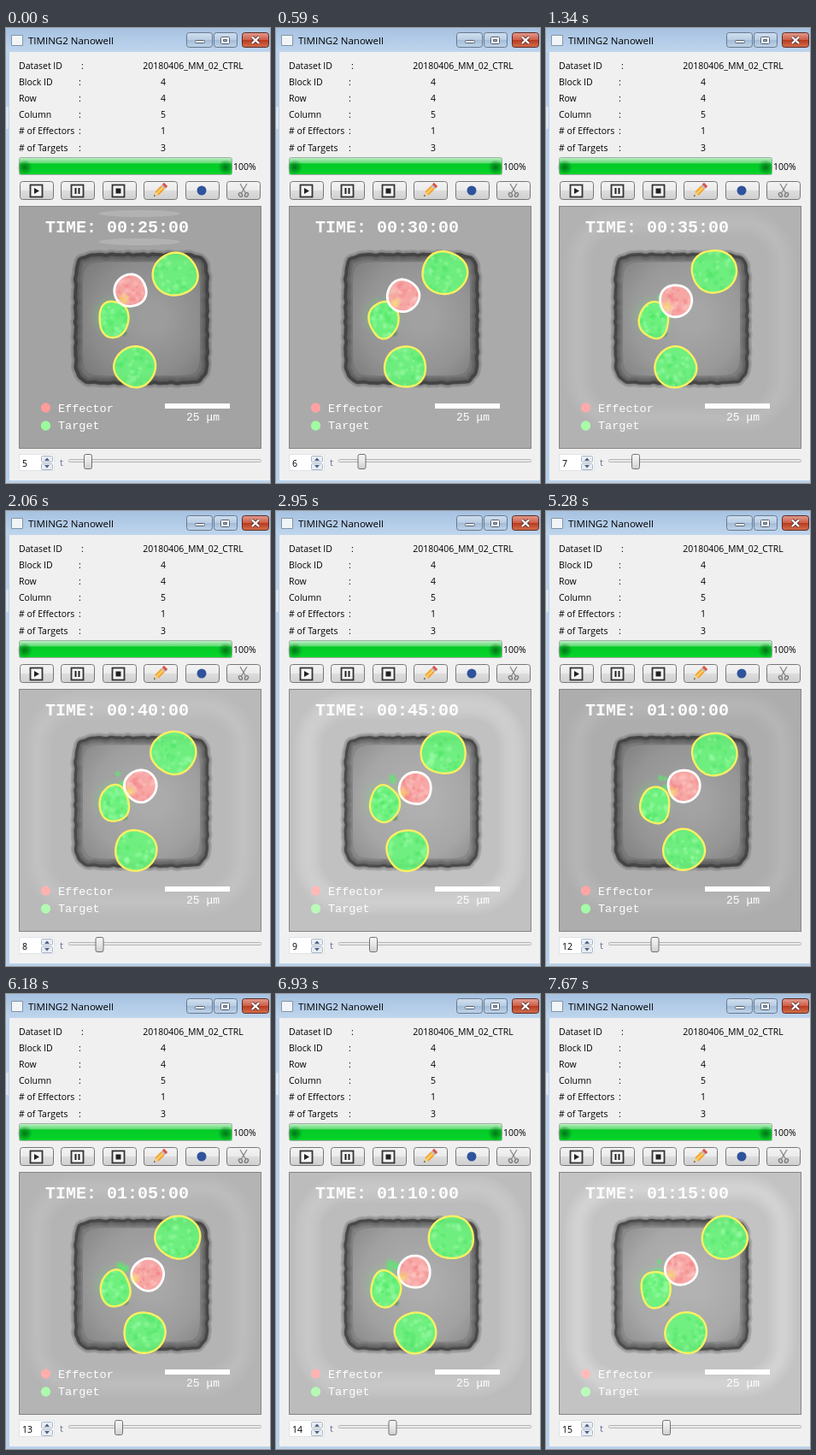
An HTML page with a canvas that plays this animation: 309 px wide and 532 px high, repeating every 8 s.

```html
<!DOCTYPE html>
<html lang="en">
<head>
<meta charset="utf-8">
<title>Nanowell viewer</title>
<style>
  html, body { margin: 0; width: 100%; height: 100%; overflow: hidden; background: #f0f0f0; }
  canvas { display: block; width: 309px; height: 532px; }
</style>
</head>
<body>
<canvas id="stage"></canvas>
<script>
const W = 309, H = 532, LOOP = 8000;
const FIRST = 5, LAST = 15;
const STARTS = [0, 590, 1340, 2060, 2950, 3670, 4540, 5280, 6180, 6930, 7670];
const UI = '"Open Sans", "Noto Sans", sans-serif';
const MONO = '"Liberation Mono", monospace';
const TAU = Math.PI * 2;

const canvas = document.getElementById('stage');
const ctx = canvas.getContext('2d');
const dpr = window.devicePixelRatio || 1;
canvas.width = Math.round(W * dpr);
canvas.height = Math.round(H * dpr);
ctx.scale(dpr, dpr);

const GREEN = { fill: '106,248,124', light: '165,255,175', dark: '68,226,96', rim: '#fbf062', rimWidth: 2.4 };
const PINK = { fill: '255,168,166', light: '255,205,200', dark: '243,120,124', rim: '#fff', rimWidth: 2.8 };

// Each path holds points evenly spaced over the whole run.
const upper = { look: GREEN, rx: 26.3, ry: 24.8, lobe: .018, path: [[198, 288], [196, 282], [196, 284], [209, 285]] };
const left = { look: GREEN, rx: 17.2, ry: 21.4, lobe: .035, path: [[126, 340.5], [128.5, 345.5]] };
const lower = { look: GREEN, rx: 24.2, ry: 23.8, lobe: .018, path: [[151, 396], [152, 397], [161, 396], [164, 396]] };
const effector = { look: PINK, rx: 18.7, ry: 18.7, lobe: .018,
  path: [[145.5, 307], [152, 319], [163, 324], [157, 315], [166, 328], [158, 321.5]] };
const CELLS = [upper, left, lower, effector];

function position(path, t) {
  const u = (t - FIRST) / (LAST - FIRST) * (path.length - 1);
  const i = Math.min(Math.floor(u), path.length - 2);
  return path[i].map((v, j) => v + (path[i + 1][j] - v) * (u - i));
}

// Brightness climbs for seven time points, then refocuses.
const brightness = t => Math.min(196, 163 + 6 * ((t - FIRST) % 7) + 1.4 * (t - FIRST));

function random(seed) {
  return () => {
    seed = (seed * 1664525 + 1013904223) % 4294967296;
    return seed / 4294967296;
  };
}

const gray = v => { v = Math.round(v); return `rgb(${v},${v},${v})`; };

function rect(x, y, w, h, fill) {
  ctx.fillStyle = fill;
  ctx.fillRect(x, y, w, h);
}

function box(x, y, w, h, r, fill, stroke) {
  ctx.beginPath();
  ctx.roundRect(x + .5, y + .5, w - 1, h - 1, r);
  ctx.fillStyle = fill;
  ctx.fill();
  if (!stroke) return;
  ctx.strokeStyle = stroke;
  ctx.lineWidth = 1;
  ctx.stroke();
}

function ellipse(x, y, rx, ry, fill) {
  ctx.beginPath();
  ctx.ellipse(x, y, rx, ry, 0, 0, TAU);
  ctx.fillStyle = fill;
  ctx.fill();
}

const disc = (x, y, r, fill) => ellipse(x, y, r, r, fill);

function poly(points, fill) {
  ctx.beginPath();
  points.forEach(([x, y]) => ctx.lineTo(x, y));
  ctx.closePath();
  ctx.fillStyle = fill;
  ctx.fill();
}

function stroke(color, width) {
  ctx.strokeStyle = color;
  ctx.lineWidth = width;
  ctx.stroke();
}

function line(x1, y1, x2, y2, color, width) {
  ctx.beginPath();
  ctx.moveTo(x1, y1);
  ctx.lineTo(x2, y2);
  stroke(color, width);
}

function vertical(y, h, ...stops) {
  const g = ctx.createLinearGradient(0, y, 0, y + h);
  stops.forEach(([at, color]) => g.addColorStop(at, color));
  return g;
}

function glow(x, y, r, rgb, alpha) {
  const g = ctx.createRadialGradient(x, y, 0, x, y, r);
  g.addColorStop(0, `rgba(${rgb},${alpha})`);
  g.addColorStop(1, `rgba(${rgb},0)`);
  disc(x, y, r, g);
}

function text(str, x, y, font, color = '#000', align = 'left') {
  ctx.font = font;
  ctx.fillStyle = color;
  ctx.textAlign = align;
  ctx.fillText(str, x, y);
}

const label = (str, x, y, align) => text(str, x, y, '10.5px ' + UI, '#000', align);

function titleBar() {
  rect(0, 0, W, 28, vertical(0, 28, [0, '#a6c2e1'], [1, '#bfd5ed']));
  rect(0, 28, 4, H, '#b9d1ea');
  rect(0, 92, 3, 26, '#d9e5f2');
  box(6, 8, 14, 13, 0, '#f2f5f7', '#8494a6');
  text('TIMING2 Nanowell', 26, 18.5, '11.5px ' + UI);

  const glass = vertical(5, 18, [0, '#d3e1f0'], [.48, '#b9cde3'], [.52, '#a3bcd8'], [1, '#c2d6ea']);
  const red = vertical(5, 18, [0, '#e2a093'], [.48, '#cf5f49'], [.52, '#b83a20'], [1, '#d5744f']);
  box(211, 5, 31, 18, 3, glass, '#66788f');
  box(243, 5, 28, 18, 3, glass, '#66788f');
  box(276, 5, 32, 18, 3, red, '#5b2a27');
  box(221, 14, 12, 4, 1, '#fff', '#535f6f');
  box(251, 10, 11, 9, 1, '#fff', '#535f6f');
  box(254, 13, 5, 3, 0, '#9db4cf', '#535f6f');
  for (const [color, width] of [['#5d3a3a', 4], ['#fff', 2.3]]) {
    line(288, 10.5, 296, 18, color, width);
    line(296, 10.5, 288, 18, color, width);
  }
}

function info() {
  const rows = [['Dataset ID', '20180406_MM_02_CTRL'], ['Block ID', '4'], ['Row', '4'],
    ['Column', '5'], ['# of Effectors', '1'], ['# of Targets', '3']];
  rows.forEach(([name, value], i) => {
    const y = 48 + i * 19.1;
    label(name, 15, y);
    label(':', i ? 85 : 88, y);
    label(value, i ? 184 : 219, y, 'center');
  });
}

function progress() {
  box(15, 151, 250, 21, 2, vertical(151, 21,
    [0, '#d3f4d8'], [.1, '#a9ebb3'], [.32, '#62dc75'], [.38, '#04ca26'], [1, '#04d62a']), '#a3aea5');
  for (const x of [22, 257]) glow(x, 163, 9, '0,95,20', .8);
  label('100%', 266, 166);
}

function frameIcon(cx) {
  box(cx - 7, 183, 15, 15, 2, '#f4f4f4');
  ctx.strokeStyle = '#333';
  ctx.lineWidth = 1.8;
  ctx.strokeRect(cx - 6.5, 183.5, 14, 14);
}

function pencil(x, y) {
  ctx.save();
  ctx.translate(x, y);
  ctx.rotate(-Math.PI / 4);
  rect(-5, -3, 10, 6, '#f2a431');
  rect(-5, -1, 10, 2, '#ffd06b');
  rect(5, -3, 2, 6, '#b9bcc4');
  rect(7, -3, 3, 6, '#d9534a');
  poly([[-5, -3], [-10, 0], [-5, 3]], '#e8cfa4');
  poly([[-8, -1], [-10, 0], [-8, 1]], '#333');
  ctx.restore();
}

function scissors(x, y) {
  for (const side of [-1, 1]) {
    line(x + side * 4, y - 8, x - side * 2.5, y + 3, '#888', 1.3);
    ctx.beginPath();
    ctx.ellipse(x + side * 3.5, y + 5, 1.8, 2.6, side / 2, 0, TAU);
    stroke('#777', 1.3);
  }
}

function toolbar() {
  const face = vertical(179, 22, [0, '#f4f4f4'], [.48, '#ebebeb'], [.52, '#dcdcdc'], [1, '#cfcfcf']);
  for (let i = 0; i < 6; i++) box(Math.round(16 + i * 48.4), 179, 40, 22, 3, face, '#777');
  [35, 83, 131].forEach(frameIcon);
  poly([[33, 187], [39, 190.5], [33, 194]], '#222');
  rect(80.5, 187, 2, 7, '#222');
  rect(84.5, 187, 2, 7, '#222');
  rect(128.5, 187.5, 6, 6, '#222');
  pencil(180, 190);
  disc(229, 190, 5.5, '#2f539c');
  scissors(278, 190);
}

// Squarish outline of the well with a ragged edge.
function wellPath(inset, rough = 0) {
  const n = 9, count = 260;
  ctx.beginPath();
  for (let i = 0; i < count; i++) {
    const a = i / count * TAU, c = Math.cos(a), s = Math.sin(a);
    const r = (Math.abs(c) ** n + Math.abs(s) ** n) ** (-1 / n);
    const d = rough * (Math.sin(a * 31) + .7 * Math.sin(a * 53 + 1)) * .45 - inset;
    ctx.lineTo(158.5 + r * c * (79.5 + d), 340 + r * s * (77.5 + d));
  }
  ctx.closePath();
}

function well(level) {
  const dim = (196 - level) / 33;
  wellPath(1, 1);
  ctx.fillStyle = gray(level * .7);
  ctx.fill();
  wellPath(11);
  const g = ctx.createRadialGradient(172, 338, 15, 160, 340, 98);
  g.addColorStop(0, gray(level * .91 + dim * 8));
  g.addColorStop(.6, gray(level * .86));
  g.addColorStop(1, gray(level * .73));
  ctx.fillStyle = g;
  ctx.fill();
  for (let w = 3; w <= 12; w += 3) {
    wellPath(3, 1);
    stroke('rgba(60,60,60,.17)', w);
  }
  wellPath(2.5, 1);
  stroke(gray(76 - dim * 10), 2.8 + dim);
}

function backdrop(level) {
  const halo = Math.max(0, (level - 166) / 30);
  rect(15, 208, 284, 284, gray(level));
  for (let w = 6; w <= 34; w += 4) {
    ctx.beginPath();
    ctx.roundRect(37, 227, 240, 229, 48);
    stroke(`rgba(255,255,255,${.032 * halo})`, w);
  }
  if (!halo) {
    for (const y of [217, 250]) ellipse(156, y, 48, 4, 'rgba(255,255,255,.16)');
  }
  well(level);
}

function cellPath(x, y, { rx, ry, lobe }, phase) {
  ctx.beginPath();
  for (let i = 0; i < 90; i++) {
    const a = i / 90 * TAU;
    const r = 1 + lobe * Math.sin(3 * a + phase) + lobe * .6 * Math.sin(4 * a + phase * 2);
    ctx.lineTo(x + rx * r * Math.cos(a), y + ry * r * Math.sin(a));
  }
  ctx.closePath();
}

function drawCell(cell, index, t) {
  const { look, rx, ry } = cell;
  const [x, y] = position(cell.path, t);
  const phase = t * 1.3 + index * 2;
  const rnd = random(t * 977 + index * 131);
  cellPath(x, y, cell, phase);
  ctx.save();
  ctx.clip();
  rect(x - 35, y - 35, 70, 70, `rgba(${look.fill},.9)`);
  for (let i = 0; i < 34; i++) {
    const a = rnd() * TAU, d = Math.sqrt(rnd()) * .95;
    const rgb = rnd() > .45 ? look.light : look.dark;
    glow(x + rx * d * Math.cos(a), y + ry * d * Math.sin(a), 2 + rnd() * 3.5, rgb, .5);
  }
  ctx.restore();
  cellPath(x, y, cell, phase);
  stroke(look.rim, look.rimWidth);
}

// Loose fluorescence around the contact between the effector and its neighbour.
function debris(t) {
  const [x, y] = position(left.path, t);
  const rnd = random(t * 53);
  glow(x - 2, y - 4, 28, '110,240,120', .4);
  for (let i = 0; i < 3; i++) glow(x + 2 + rnd() * 20, y - 36 + rnd() * 16, 4 + rnd() * 4, '85,240,105', .8);
  glow(x + 12, y + 16, 5, '40,130,60', .7);
}

function contact(t) {
  const [ex, ey] = position(effector.path, t);
  const [x, y] = position(left.path, t);
  glow(ex * .6 + x * .4, ey * .7 + y * .3, 8, '250,240,90', .6);
}

function overlay(t, level) {
  const pad = n => String(n).padStart(2, '0');
  const minutes = t * 5;
  text(`TIME: ${pad(Math.floor(minutes / 60))}:${pad(minutes % 60)}:00`, 46, 239, 'bold 20px ' + MONO, '#fff');
  const tint = Math.round(level - 8);
  disc(46.5, 444, 5.7, `rgb(255,${tint},${tint})`);
  disc(46.5, 465, 5.7, `rgb(${tint},250,${tint})`);
  text('Effector', 61, 449, '13.5px ' + MONO, '#fff');
  text('Target', 61, 469, '13.5px ' + MONO, '#fff');
  rect(186, 439, 76, 6, '#fff');
  text('25 μm', 211, 459, '13px ' + MONO, '#fff');
}

function microscopy(t) {
  const level = brightness(t);
  ctx.save();
  ctx.beginPath();
  ctx.rect(15, 208, 284, 284);
  ctx.clip();
  backdrop(level);
  debris(t);
  CELLS.forEach((cell, i) => drawCell(cell, i, t));
  contact(t);
  overlay(t, level);
  ctx.restore();
  ctx.strokeStyle = '#858585';
  ctx.lineWidth = 1;
  ctx.strokeRect(15.5, 208.5, 283, 283);
}

function controls(t) {
  box(15, 498, 42, 20, 0, '#fff', '#dfe3e8');
  label(String(t), 19, 512.5);
  for (const y of [500, 509]) box(41, y, 14, 8, 1, '#e9edf2', '#a9b6c6');
  poly([[45, 506], [48, 502.5], [51, 506]], '#4a6186');
  poly([[45, 511], [48, 514.5], [51, 511]], '#4a6186');
  text('t', 63, 512, '11px ' + UI, '#6b6b9c');
  box(73, 504, 226, 4, 1, '#e7eaea', '#b5b5b5');
  const x = 91 + (t - FIRST) * 4.5;
  box(x, 498, 10, 18, 2, vertical(498, 18, [0, '#f7f7f7'], [.5, '#e6e6e6'], [1, '#cdcdcd']), '#707070');
}

function draw(t) {
  rect(0, 0, W, H, '#f0f0f0');
  titleBar();
  info();
  progress();
  toolbar();
  microscopy(t);
  controls(t);
  rect(0, 529, W, 3, '#b9d1ea');
}

const start = performance.now();
let shown = -1;

function tick() {
  const ms = (performance.now() - start) % LOOP;
  const step = STARTS.findLastIndex(s => s <= ms);
  if (step !== shown) {
    shown = step;
    draw(FIRST + step);
  }
  requestAnimationFrame(tick);
}
tick();
</script>
</body>
</html>
```
